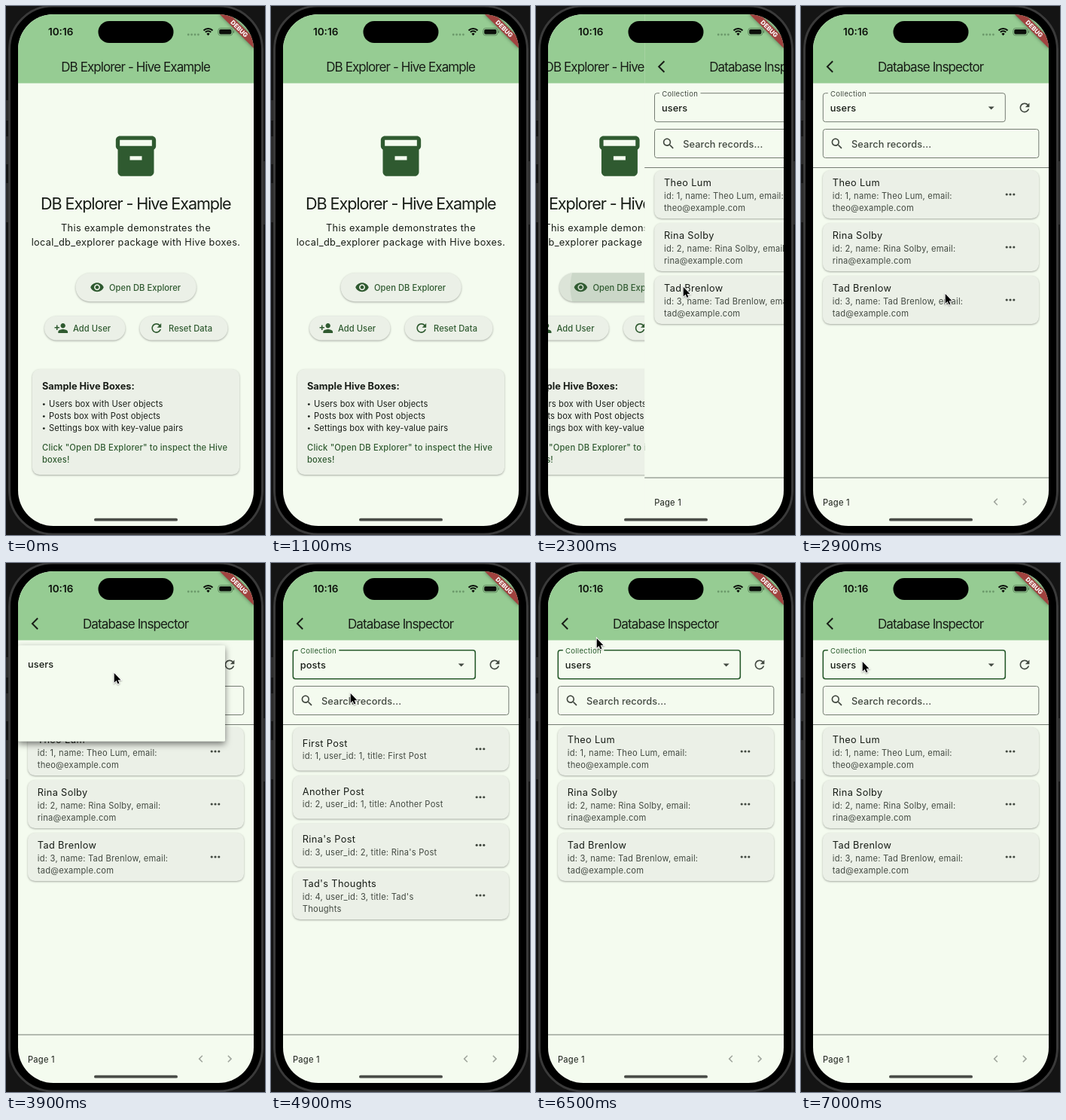
Write an HTML page with a canvas that moves like this. It is 344x702 px and loops after 7100 ms.

```html
<!DOCTYPE html>
<html lang="en">
<head>
<meta charset="utf-8">
<title>DB Explorer</title>
<style>
html, body { margin: 0; width: 100%; height: 100%; overflow: hidden; background: #141414; }
canvas { display: block; }
</style>
</head>
<body>
<canvas id="stage" width="344" height="702"></canvas>
<script>
const ctx = document.getElementById('stage').getContext('2d');
const LOOP = 7100, STEP = 100;
const SCREEN = { x: 16, y: 11, w: 313, h: 679, r: 47 };
const DP = 0.797;
const INK = '#181d17', MUTED = '#424941', GREEN = '#2f5a30', BODY = '#f4fbef',
      BAR = '#96cc93', CARD = '#ebf0e7', LINE = '#747b72', FOCUS = '#285a2c';

const ICONS = {
  box: 'M20 2H4c-1 0-2 .9-2 2v3.01c0 .72.43 1.34 1 1.69V20c0 1.1 1.1 2 2 2h14c.9 0 2-.9 2-2V8.7c.57-.35 1-.97 1-1.69V4c0-1.1-1-2-2-2zm-5 12H9v-2h6v2zm5-7H4V4h16z',
  eye: 'M12 4.5C7 4.5 2.73 7.61 1 12c1.73 4.39 6 7.5 11 7.5s9.27-3.11 11-7.5c-1.73-4.39-6-7.5-11-7.5zM12 17c-2.76 0-5-2.24-5-5s2.24-5 5-5 5 2.24 5 5-2.24 5-5 5zm0-8c-1.66 0-3 1.34-3 3s1.34 3 3 3 3-1.34 3-3-1.34-3-3-3z',
  addUser: 'M15 12c2.21 0 4-1.79 4-4s-1.79-4-4-4-4 1.79-4 4 1.79 4 4 4zm-9-2V7H4v3H1v2h3v3h2v-3h3v-2H6zm9 4c-2.67 0-8 1.34-8 4v2h16v-2c0-2.66-5.33-4-8-4z',
  refresh: 'M17.65 6.35C16.2 4.9 14.21 4 12 4c-4.42 0-8 3.58-8 8s3.58 8 8 8c3.73 0 6.84-2.55 7.73-6h-2.08c-.82 2.33-3.04 4-5.65 4-3.31 0-6-2.69-6-6s2.69-6 6-6c1.66 0 3.14.69 4.22 1.78L13 11h7V4z',
  search: 'M15.5 14h-.79l-.28-.27C15.41 12.59 16 11.11 16 9.5 16 5.91 13.09 3 9.5 3S3 5.91 3 9.5 5.91 16 9.5 16c1.61 0 3.09-.59 4.23-1.57l.27.28v.79l5 4.99L20.49 19zm-6 0C7.01 14 5 11.99 5 9.5S7.01 5 9.5 5 14 7.01 14 9.5 11.99 14 9.5 14z',
  back: 'M17.77 3.77 16 2 6 12l10 10 1.77-1.77L9.54 12z',
  drop: 'M7 10l5 5 5-5z',
  left: 'M15.41 7.41 14 6l-6 6 6 6 1.41-1.41L10.83 12z',
  right: 'M8.59 16.59 10 18l6-6-6-6-1.41 1.41L13.17 12z',
  arrow: 'M0 0V14.4L3.3 11.3 5.4 16.2 7.7 15.2 5.6 10.5H10z'
};
for (const name in ICONS) ICONS[name] = new Path2D(ICONS[name]);

// size, weight, letter spacing
const TYPE = {
  headline: [21.6, 400, -1.1],
  title: [17, 400, -0.9],
  body: [12.75, 400, 0.35],
  strong: [12.75, 700, 0],
  field: [12.75, 500, 0.1],
  small: [11.16, 400, 0.22],
  list: [11.16, 400, 0.12],
  note: [11.16, 500, 0.2],
  button: [11.16, 500, 0.05],
  caption: [9.56, 400, 0.27],
  clock: [13.5, 600, 0],
  debug: [8.1, 800, 0]
};

const LISTS = {
  users: [
    [218, 64, 'Theo Lum', 'id: 1, name: Theo Lum, email:', 'theo@example.com'],
    [288, 64, 'Rina Solby', 'id: 2, name: Rina Solby, email:', 'rina@example.com'],
    [358, 64, 'Tad Brenlow', 'id: 3, name: Tad Brenlow, email:', 'tad@example.com']
  ],
  posts: [
    [218, 57.5, 'First Post', 'id: 1, user_id: 1, title: First Post'],
    [282, 57.5, 'Another Post', 'id: 2, user_id: 1, title: Another Post'],
    [345.7, 57.5, "Rina's Post", "id: 3, user_id: 2, title: Rina's Post"],
    [409, 64, "Tad's Thoughts", "id: 4, user_id: 3, title: Tad's", 'Thoughts']
  ]
};
const ITEMS = ['users', 'posts', 'settings'];
const MENUS = [
  { open: 3740, close: 4450, selected: 0 },
  { open: 5800, close: 6400, selected: 1 }
];
const POSTS_AT = 4500, USERS_AT = 6500;
const PRESS = 1900, RELEASE = 2150, PUSH = 2200, PUSH_TIME = 500;

// time, x, y
const POINTER = [
  [1200, 250, 470], [1700, 198, 378], [2100, 195, 371], [2400, 195, 372],
  [2900, 191, 381], [3100, 190, 375], [3600, 145, 142], [3900, 143, 145],
  [4300, 112, 170], [4900, 105, 172], [5600, 88, 140], [5900, 88, 144],
  [6300, 80, 98], [6500, 80, 99], [7000, 81, 130]
];

const clamp = v => Math.min(1, Math.max(0, v));
const span = (t, from, to) => clamp((t - from) / (to - from));
const mix = (a, b, p) => a + (b - a) * p;
const smooth = p => p * p * (3 - 2 * p);

function text(str, x, cy, style, color = INK, align = 'left') {
  const [size, weight, spacing] = TYPE[style];
  ctx.font = `${weight} ${size}px Inter, sans-serif`;
  ctx.letterSpacing = spacing + 'px';
  ctx.textAlign = align;
  ctx.fillStyle = color;
  ctx.fillText(str, x, cy + size * 0.36);
}

function icon(name, cx, cy, size = 24 * DP, color = GREEN) {
  ctx.save();
  ctx.translate(cx - size / 2, cy - size / 2);
  ctx.scale(size / 24, size / 24);
  ctx.fillStyle = color;
  ctx.fill(ICONS[name]);
  ctx.restore();
}

function roundRect(x, y, w, h, r) {
  ctx.beginPath();
  ctx.roundRect(x, y, w, h, r);
}

function fillRound(x, y, w, h, r, color) {
  roundRect(x, y, w, h, r);
  ctx.fillStyle = color;
  ctx.fill();
}

function dot(x, y, r, color) {
  ctx.beginPath();
  ctx.arc(x, y, r, 0, Math.PI * 2);
  ctx.fillStyle = color;
  ctx.fill();
}

function raised(x, y, w, h, r, color = CARD, blur = 2.5, drop = 1, alpha = 0.32) {
  ctx.save();
  ctx.shadowColor = `rgba(0,0,0,${alpha})`;
  ctx.shadowBlur = blur;
  ctx.shadowOffsetY = drop;
  fillRound(x, y, w, h, r, color);
  ctx.restore();
}

function outline(x, y, w, h, color, width) {
  roundRect(x, y, w, h, 3.2);
  ctx.strokeStyle = color;
  ctx.lineWidth = width;
  ctx.stroke();
}

function page(title) {
  ctx.fillStyle = BODY;
  ctx.fillRect(SCREEN.x, SCREEN.y, SCREEN.w, SCREEN.h);
  ctx.fillStyle = BAR;
  ctx.fillRect(SCREEN.x, SCREEN.y, SCREEN.w, 91.5);
  text(title, 172.1, 81, 'title', INK, 'center');
}

function home(t) {
  page('DB Explorer - Hive Example');
  icon('box', 172.5, 199.2, 64);
  text('DB Explorer - Hive Example', 172.3, 262.5, 'headline', INK, 'center');
  text('This example demonstrates the', 172.5, 294, 'body', INK, 'center');
  text('local_db_explorer package with Hive boxes.', 172.5, 313, 'body', INK, 'center');

  raised(92.5, 354.2, 160.3, 38, 19);
  if (t >= 1700) {
    ctx.save();
    roundRect(92.5, 354.2, 160.3, 38, 19);
    ctx.clip();
    ctx.fillStyle = 'rgba(47,90,48,.08)';
    ctx.fillRect(92, 354, 162, 39);
    if (t >= PRESS) {
      const grow = mix(1.4 * span(t, PRESS, PRESS + 1000), 1, span(t, RELEASE, RELEASE + 225));
      const fade = 1 - span(t, RELEASE + 75, RELEASE + 450);
      dot(mix(197, 172, grow), 373, mix(24, 82, grow * 0.9), `rgba(47,90,48,${0.12 * fade})`);
    }
    ctx.restore();
  }
  icon('eye', 121, 373.2);
  text('Open DB Explorer', 137, 373.5, 'button', GREEN);

  raised(51, 411.5, 107.5, 32, 16);
  icon('addUser', 73.3, 427.5);
  text('Add User', 89, 427.5, 'button', GREEN);
  raised(177.5, 411.5, 117, 32, 16);
  icon('refresh', 199.8, 427.5);
  text('Reset Data', 216, 427.5, 'button', GREEN);

  raised(35, 482, 275, 140, 9.6);
  text('Sample Hive Boxes:', 48, 504.3, 'strong');
  ['Users box with User objects', 'Posts box with Post objects', 'Settings box with key-value pairs']
    .forEach((line, i) => {
      const y = 528 + i * 16;
      dot(50.3, y + 0.6, 1.4, INK);
      text(line, 57, y, 'list');
    });
  text('Click "Open DB Explorer" to inspect the Hive', 48, 586, 'note', GREEN);
  text('boxes!', 48, 602, 'note', GREEN);
}

function record([y, h, title, ...lines]) {
  raised(29, y, 287, h, 9.6);
  const mid = y + h / 2;
  const top = lines.length > 1 ? y + 16.5 : mid - 7.7;
  text(title, 41.8, top, 'body');
  lines.forEach((line, i) => text(line, 41.8, top + 17.4 + i * 16, 'small', MUTED));
  for (const dx of [-4.8, 0, 4.8]) dot(278 + dx, mid, 1.6, MUTED);
}

function inspector(t) {
  page('Database Inspector');
  icon('back', 38.3, 80.5, 24 * DP, INK);
  const current = t >= POSTS_AT && t < USERS_AT ? 'posts' : 'users';
  const focused = t >= POSTS_AT;
  outline(29.3, 115.7, 242, 38, focused ? FOCUS : LINE, focused ? 1.6 : 1);
  ctx.fillStyle = BODY;
  ctx.fillRect(35.8, 113.5, 54.5, 4);
  text('Collection', 39, 116.2, 'caption', focused ? FOCUS : MUTED);
  text(current, 38.8, 135, 'field');
  icon('drop', 252.7, 135.2, 24 * DP, MUTED);
  icon('refresh', 297, 135, 24 * DP, MUTED);

  outline(29.3, 163.5, 286.5, 38, LINE, 1);
  icon('search', 47.8, 182.7, 24 * DP, MUTED);
  text('Search records...', 67, 183, 'field', MUTED);

  ctx.fillStyle = LINE;
  ctx.fillRect(SCREEN.x, 214, SCREEN.w, 1);
  ctx.fillRect(SCREEN.x, 625.5, SCREEN.w, 1);
  LISTS[current].forEach(record);
  text('Page 1', 29, 658.5, 'small');
  icon('left', 258.7, 658, 24 * DP, '#a0a69d');
  icon('right', 297, 658, 24 * DP, '#a0a69d');
}

// The panel unrolls from the selected row, then the other rows fade in.
function menu(t, { open, close, selected }) {
  const p = span(t, open, open + 300);
  const shown = span(p, 0, 0.25) * (1 - span(t, close, close + 75));
  if (!shown) return;
  const row = 48 * DP, pad = 8 * DP, height = 3 * row + 2 * pad;
  const top = 134.8 - row / 2 - selected * row - pad;
  const start = selected * row + pad, unroll = span(p, 0.25, 0.5);
  const y1 = top + mix(start, 0, unroll);
  const y2 = top + mix(start + row, height, unroll);
  ctx.save();
  ctx.globalAlpha = shown;
  raised(16, y1, 275, y2 - y1, 1.6, BODY, 9, 3.5, 0.5);
  roundRect(16, y1, 275, y2 - y1, 1.6);
  ctx.clip();
  const unit = 0.5 / 4.5;
  ITEMS.forEach((name, i) => {
    const from = 0.5 + (i + 1) * unit;
    const fade = i === selected ? 1 : span(p, from, Math.min(1, from + 1.5 * unit));
    ctx.globalAlpha = shown * fade;
    text(name, 29, top + pad + row * (i + 0.5), 'field');
  });
  ctx.restore();
}

function statusBar() {
  text('10:16', 56, 34.5, 'clock', '#0b0f0a');
  fillRound(122.5, 20, 100, 29, 14.5, '#000');
  for (let i = 0; i < 4; i++) dot(242.2 + i * 4.4, 38, 1.4, '#6c9a6b');
  ctx.strokeStyle = '#0b0f0a';
  ctx.lineWidth = 2;
  for (const r of [8.5, 5.2]) {
    ctx.beginPath();
    ctx.arc(268.5, 38.5, r, -Math.PI * 0.75, -Math.PI * 0.25);
    ctx.stroke();
  }
  ctx.beginPath();
  ctx.moveTo(268.5, 39.3);
  ctx.arc(268.5, 39, 3, -Math.PI * 0.75, -Math.PI * 0.25);
  ctx.fillStyle = '#0b0f0a';
  ctx.fill();
  roundRect(281.8, 29.5, 19, 9.5, 3);
  ctx.strokeStyle = '#5b815a';
  ctx.lineWidth = 0.9;
  ctx.stroke();
  fillRound(283.2, 30.9, 16.2, 6.7, 1.8, '#0b0f0a');
  fillRound(301.8, 32.6, 1.2, 3.4, 0.6, '#5b815a');
}

function debugBanner() {
  ctx.save();
  ctx.translate(SCREEN.x + SCREEN.w, SCREEN.y);
  ctx.rotate(Math.PI / 4);
  ctx.shadowColor = 'rgba(0,0,0,.45)';
  ctx.shadowBlur = 5;
  ctx.fillStyle = '#a0423f';
  ctx.fillRect(-32, 22.3, 64, 9.6);
  ctx.shadowColor = 'transparent';
  text('DEBUG', 0, 27.1, 'debug', '#fff', 'center');
  ctx.restore();
}

function phone() {
  ctx.fillStyle = '#141414';
  ctx.fillRect(0, 0, 344, 702);
  ctx.fillStyle = '#2c2c2c';
  for (const [y, h] of [[125, 27], [173, 37], [235, 52]]) ctx.fillRect(0, y, 4, h);
  ctx.fillRect(341, 206, 3, 84);
  fillRound(3, -1.5, 339, 704, 59, '#000');
  roundRect(4.5, 0, 336, 701, 57.5);
  ctx.strokeStyle = '#3a3a3a';
  ctx.lineWidth = 3;
  ctx.stroke();
}

function pointer(t) {
  const next = POINTER.findIndex(k => k[0] > t);
  if (next === 0) return;
  const b = POINTER[next < 0 ? POINTER.length - 1 : next];
  const a = next < 0 ? b : POINTER[next - 1];
  const p = a === b ? 0 : smooth(span(t, a[0], b[0]));
  ctx.save();
  ctx.translate(mix(a[1], b[1], p) + 0.7, mix(a[2], b[2], p) + 1);
  ctx.scale(0.88, 0.88);
  ctx.shadowColor = 'rgba(0,0,0,.35)';
  ctx.shadowBlur = 2;
  ctx.shadowOffsetY = 1;
  ctx.strokeStyle = '#fff';
  ctx.lineWidth = 2;
  ctx.stroke(ICONS.arrow);
  ctx.shadowColor = 'transparent';
  ctx.fillStyle = '#000';
  ctx.fill(ICONS.arrow);
  ctx.restore();
}

function shifted(dx, draw) {
  ctx.save();
  ctx.translate(dx, 0);
  draw();
  ctx.restore();
}

function render(t) {
  phone();
  ctx.save();
  roundRect(SCREEN.x, SCREEN.y, SCREEN.w, SCREEN.h, SCREEN.r);
  ctx.clip();
  const push = 1 - (1 - span(t, PUSH, PUSH + PUSH_TIME)) ** 4;
  if (push < 1) shifted(-push * SCREEN.w / 3, () => home(t));
  if (push > 0) shifted((1 - push) * SCREEN.w, () => inspector(t));
  MENUS.forEach(m => menu(t, m));
  statusBar();
  debugBanner();
  fillRound(117, 679.8, 111, 3.8, 1.9, '#4a4d48');
  ctx.restore();
  pointer(t);
}

const begun = performance.now();
function tick() {
  const t = (performance.now() - begun) % LOOP;
  render(Math.floor(t / STEP) * STEP);
  requestAnimationFrame(tick);
}
tick();
</script>
</body>
</html>
```
